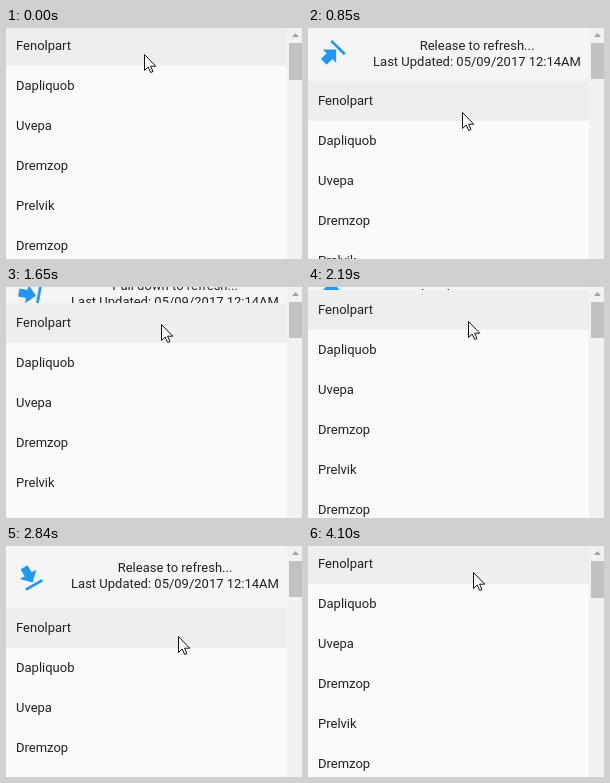
An HTML page with a canvas for the animation above (4.2 s loop, 296x231 px).

```html
<!DOCTYPE html>
<html lang="en">
<head>
<meta charset="utf-8">
<title>Pull to refresh</title>
<style>
html, body { margin: 0; height: 100%; overflow: hidden; background: #fafafa; }
canvas { display: block; }
</style>
</head>
<body>
<canvas id="stage" width="296" height="231"></canvas>
<script>
const W = 296, H = 231, LOOP = 4200, ROW = 40, LIST_W = 281;
const TURN = 370, LEAD = 35;
const ctx = document.getElementById('stage').getContext('2d');
const names = ['Fenolpart', 'Dapliquob', 'Uvepa', 'Dremzop', 'Prelvik', 'Dremzop'];
const arrow = new Path2D('M5 4v2h14V4zM5 14h4v6h6v-6h4l-7-7z');
const pointer = new Path2D('M.5 .5V16.5L4.2 13L6.7 18.5L9 17.5L6.6 12.2H11.7Z');

// Two drags: the list eases down by height, rests, then eases back.
const pulls = [
  { down: [430, 950], up: [1329, 1780], height: 61, armed: 758, disarmed: 1456 },
  { down: [2080, 2722], up: [2800, 3980], height: 64, armed: 2501, disarmed: 3236 }
];
const bursts = [0, 470, 1020, 1550, 2120, 2670, 3250, 3800];

const clamp = u => Math.max(0, Math.min(1, u));

function smooth(a, b, t) {
  const u = clamp((t - a) / (b - a));
  return u * u * (3 - 2 * u);
}

// Each burst is shown in steps of 70, 70 and 100 ms.
function hold(t) {
  const start = bursts.filter(b => b <= t).pop();
  const d = t - start;
  return start + 240 * Math.floor(d / 240) + 70 * Math.min(2, Math.floor(d % 240 / 70));
}

function offsetAt(t) {
  return pulls.reduce((sum, p) =>
    sum + p.height * (smooth(...p.down, t) - smooth(...p.up, t)), 0);
}

function turnAt(t) {
  return pulls.reduce((sum, p) =>
    sum + clamp((t - p.armed) / TURN) - clamp((t - p.disarmed) / TURN), 0);
}

function rect(color, x, y, w, h) {
  ctx.fillStyle = color;
  ctx.fillRect(x, y, w, h);
}

function text(s, x, y, align) {
  ctx.fillStyle = '#212121';
  ctx.textAlign = align;
  ctx.fillText(s, x, y);
}

function drawHeader(t, offset) {
  const mid = offset / 2 - 1;
  const armed = pulls.some(p => t >= p.armed && t < p.disarmed);

  rect('#f5f5f5', 0, 0, LIST_W, offset);
  ctx.save();
  ctx.translate(23.4, mid - 0.3);
  ctx.rotate(Math.PI * turnAt(t));
  ctx.scale(1.35, 1.35);
  ctx.translate(-12, -12);
  ctx.fillStyle = '#2196f3';
  ctx.fill(arrow);
  ctx.restore();

  const y = Math.round(mid - 5);
  text(armed ? 'Release to refresh...' : 'Pull down to refresh...', 169, y, 'center');
  text('Last Updated: 05/09/2017 12:14AM', 169, y + 16, 'center');
}

function drawList(top) {
  rect('#fafafa', 0, top, LIST_W, H);
  rect('#eeeeee', 0, top, LIST_W, ROW);
  names.forEach((name, i) => text(name, 10, top + 24 + i * ROW, 'left'));
}

function drawScrollbar(open) {
  rect('#f1f1f1', LIST_W, 0, W - LIST_W, H);
  rect('#c1c1c1', 283, 15, 13, open ? 36 : 37);
  ctx.fillStyle = '#a3a3a3';
  ctx.beginPath();
  ctx.moveTo(286, 9);
  ctx.lineTo(289.5, 5);
  ctx.lineTo(293, 9);
  ctx.fill();
}

function drawPointer(t) {
  const x = 138 + 17 * smooth(400, 950, t) + 17 * smooth(2050, 2450, t) - 7 * smooth(2850, 3700, t);
  const y = 26 + offsetAt(t + LEAD);
  ctx.save();
  ctx.translate(Math.round(x), Math.round(y));
  ctx.fillStyle = '#fff';
  ctx.strokeStyle = '#10101c';
  ctx.fill(pointer);
  ctx.stroke(pointer);
  ctx.restore();
}

function frame(now) {
  const t = hold(now % LOOP);
  const offset = offsetAt(t);
  ctx.font = '13px Roboto, sans-serif';
  rect('#fafafa', 0, 0, W, H);
  drawHeader(t, offset);
  drawList(Math.round(offset) - 2);
  drawScrollbar(offset > 0.5);
  drawPointer(t);
  requestAnimationFrame(frame);
}
requestAnimationFrame(frame);
</script>
</body>
</html>
```
